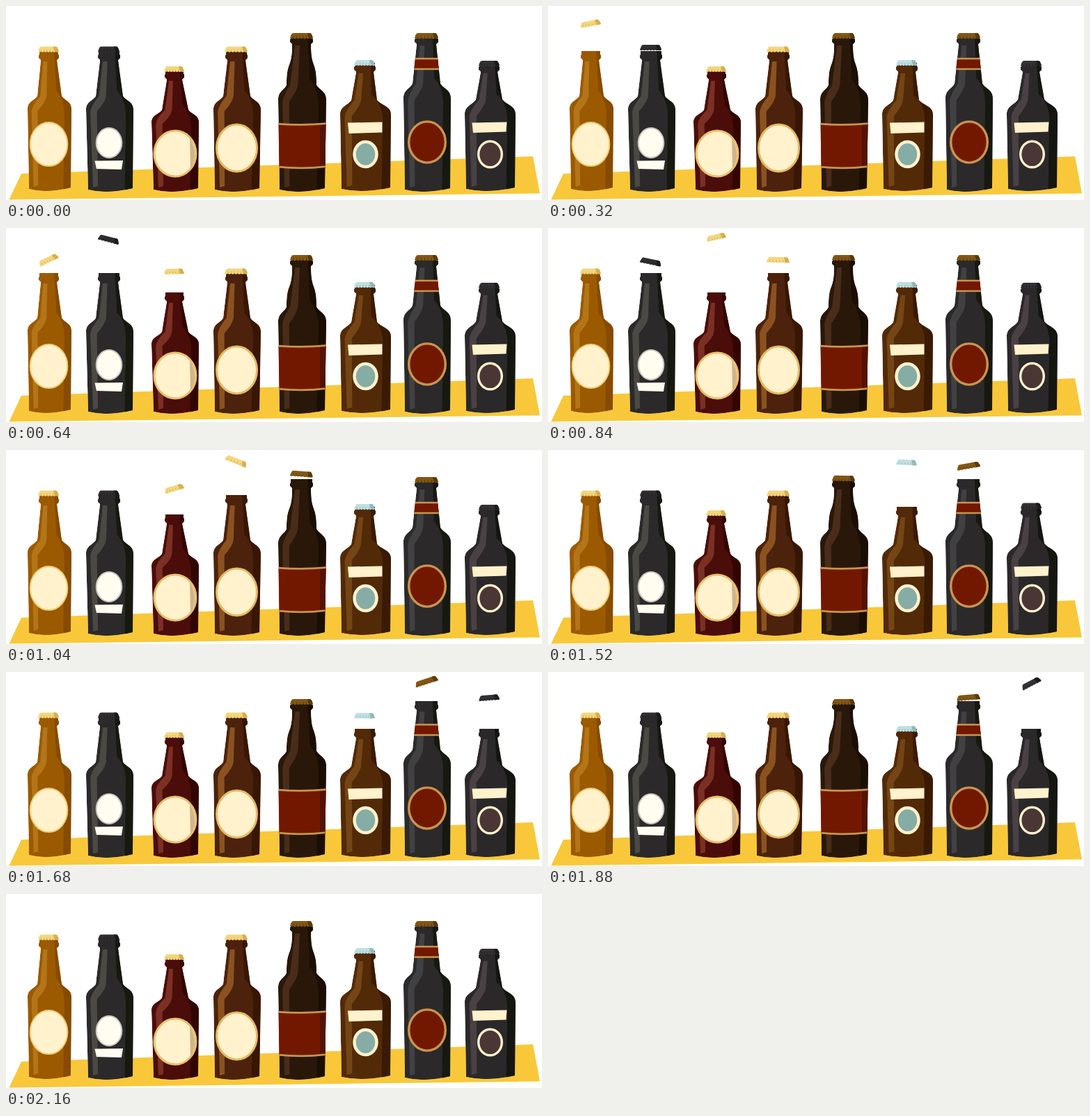
An HTML page for the animation above (3 s loop, 770 px wide and 280 px high).

```html
<!DOCTYPE html>
<html lang="en">
<head>
<meta charset="utf-8">
<title>Popping bottle caps</title>
<style>
  html, body { margin: 0; width: 100%; height: 100%; overflow: hidden; background: #fff; }
  svg { display: block; }
</style>
</head>
<body>
<svg id="stage" width="770" height="280" viewBox="0 0 770 280" xmlns="http://www.w3.org/2000/svg">
  <polygon points="22,242 757,217 767,270.5 4.5,279.5" fill="#f8c83a"/>
</svg>
<script>
const LOOP = 3000, STEP = 40;
const CREAM = '#fff2cc', RED = '#731800', TAN = '#c89550';
const stage = document.getElementById('stage');
const lerp = (a, b, k) => a + (b - a) * k;

function add(parent, tag, attrs) {
  const node = document.createElementNS('http://www.w3.org/2000/svg', tag);
  for (const key in attrs) node.setAttribute(key, attrs[key]);
  parent.appendChild(node);
  return node;
}

const oval = (cx, cy, rx, ry, fill, stroke, width) => ['ellipse',
  { cx, cy, rx, ry, fill, stroke, 'stroke-width': width }];
const poly = (points, fill) => ['polygon', { points, fill }];
const line = (d, stroke) => ['path', { d, stroke, 'stroke-width': 2.7, fill: 'none' }];

// Sections are [left, right, y]; tones are [base, light, shade]; cap is [left, right, top].
// pop is [start, duration, height, tilt, tilt skew].
const bottles = [
  { lip: [48, 75, 65], base: [45, 80, 130], body: [31, 94, 149], foot: [33, 93, 267],
    tones: ['#9b5a00', '#b37518', '#874b00'], cap: [46, 76, 58.5], capTones: ['#f3d780', '#d9ae4d'],
    pop: [36, 765, 44, -34, 1.7],
    label: [oval(61.5, 199.5, 26.8, 31.5, CREAM, '#f0cc75', 2)] },
  { lip: [133, 163, 65], base: [129, 168, 130], body: [115, 183, 150], foot: [118, 182, 268],
    tones: ['#2c292a', '#4b4943', '#171810'], cap: [132, 163, 58.5], capTones: ['#302d2f', '#1c1a1d'],
    pop: [268, 700, 46.5, 19, 1.7],
    label: [oval(148, 197.5, 18.3, 21.5, '#fffdf0', '#cbc7c2', 2),
      poly('127.5,223.5 168,223 166,236 130,235', '#fffdf0')] },
  { lip: [229, 255, 93], base: [224, 262, 150], body: [209, 277, 168], foot: [212, 276, 268],
    tones: ['#4b0d0a', '#7b3024', '#330500'], cap: [227, 256, 87], capTones: ['#f3d780', '#d9ae4d'],
    pop: [493, 715, 78, -20, 1.7],
    label: [oval(243, 213, 30, 33, CREAM, '#e9c06c', 3),
      ['path', { d: 'M264 191Q278 213 265 235Z', fill: '#cdb78d' }]] },
  { lip: [316, 346, 65], base: [312, 351, 130], body: [298, 366, 150], foot: [300, 364, 268],
    tones: ['#4c220d', '#8b5220', '#381604'], cap: [314, 347, 58.5], capTones: ['#f3d780', '#d9ae4d'],
    pop: [700, 690, 46.5, 33, 1.7],
    label: [oval(331.5, 205, 29, 34, CREAM, '#e5ba66', 3)] },
  { lip: [409, 440, 42], base: [403, 446, 114], body: [391, 460, 136], foot: [393, 458, 268], bend: 1,
    tones: ['#291809', '#4a2c1a', '#1a0e02'], cap: [408, 441, 39], capTones: ['#825717', '#5c3909'],
    pop: [925, 650, 30, 15, 1],
    label: [poly('390,170 461,170 461,233 390,233', RED), poly('451,170 461,170 461,233 451,233', '#561200'),
      line('M390 170Q425 173 461 169.5M390 232Q425 236 461 231.5', TAN)] },
  { lip: [501, 530, 82], base: [496, 533, 136], body: [480, 553, 157], foot: [482, 552, 267],
    tones: ['#532a08', '#744515', '#3a1a03'], cap: [500, 530, 78], capTones: ['#bfe0e2', '#91b8ba'],
    pop: [1110, 690, 70, 3.5, 1],
    label: [poly('491,168.5 540.5,167.5 540.5,182.5 492.5,184', CREAM),
      oval(516.5, 214, 16, 18, '#86aca6', CREAM, 4.5)] },
  { lip: [588, 620, 42], base: [584, 624, 112], body: [571, 639, 134], foot: [573, 638, 268],
    tones: ['#2b292a', '#414042', '#17180f'], cap: [587, 621, 39], capTones: ['#825717', '#5c3909'],
    pop: [1320, 660, 30, -18, 1.1],
    label: [poly('580,75 630,75 630,92 580,92', RED), line('M580 76H630M580 91H630', TAN),
      oval(605, 196.5, 26.3, 29.6, RED, TAN, 3.4)] },
  { lip: [680, 708, 82], base: [675, 713, 135], body: [659, 732, 157], foot: [661, 731, 267],
    tones: ['#2b282a', '#4a4144', '#151610'], cap: [679, 709, 79], capTones: ['#343135', '#1d1b1f'],
    pop: [1480, 680, 72, -30.5, 1.7],
    label: [poly('669.5,168.5 719.5,167.5 718.5,181.5 671,183', CREAM),
      oval(695.5, 214, 16.8, 18.8, '#4a3735', CREAM, 3.4)] }
];

// One side of the outline, listed from lip to foot.
function side(b, i) {
  const out = i ? 1 : -1, y = b.lip[2], x = b.lip[i];
  const nx = x - out * 2, ny = y + 13, [bx, by] = [b.base[i], b.base[2]];
  const [sx, sy] = [b.body[i], b.body[2]], [fx, fy] = [b.foot[i], b.foot[2]];
  const k = b.bend ? 0 : 0.33, f = b.bend ? 0.62 : 0.35;
  return [[x, y], [x, y + 5], [x + out, y + 6], [x + out, y + 10], [nx, ny],
    [lerp(nx, bx, k), lerp(ny, by, f)], [lerp(nx, bx, 1 - k), lerp(ny, by, 1 - f)], [bx, by],
    [lerp(bx, sx, 0.4), lerp(by, sy, 0.4)], [sx, lerp(by, sy, 0.4)], [sx, sy],
    [fx, fy - (i ? 5 : 3)]];
}

function outline(b) {
  const l = side(b, 0), r = side(b, 1).reverse();
  const mid = (b.foot[0] + b.foot[1]) / 2 - 4;
  return `M${l.slice(0, 5).join('L')}C${l.slice(5, 8)}C${l.slice(8, 11)}L${l[11]}` +
    `Q${mid},${b.foot[2] + 4} ${r[0]}` +
    `L${r[1]}C${r.slice(2, 5)}C${r.slice(5, 8)}L${r.slice(8).join('L')}Z`;
}

const across = (s, k) => lerp(s[0], s[1], k);

function drawBottle(b, i) {
  const d = outline(b), [tone, light, shade] = b.tones;
  add(add(stage, 'clipPath', { id: 'glass' + i }), 'path', { d });
  const g = add(stage, 'g', { 'clip-path': `url(#glass${i})` });
  add(g, 'path', { d, fill: tone });
  const [top, by, sy, fy] = [b.lip[2], b.base[2], b.body[2], b.foot[2]];
  add(g, 'path', { fill: shade, d:
    `M${across(b.lip, 0.78)},${top}L${across(b.base, 0.78)},${by - 8}` +
    `Q${across(b.body, 0.84)},${by + 6} ${across(b.body, 0.84)},${sy + 8}` +
    `L${across(b.foot, 0.82)},${fy + 4}H${b.foot[1] + 9}V${top}Z` });
  add(g, 'path', { fill: light, d:
    `M${across(b.lip, 0.2)},${top + 15}L${across(b.lip, 0.42)},${top + 15}` +
    `L${across(b.base, 0.38)},${by}Q${across(b.base, 0.34)},${by + 9} ${across(b.body, 0.23)},${sy + 2}` +
    `L${across(b.foot, 0.22)},${fy - 8}L${across(b.foot, 0.11)},${fy - 6}L${across(b.body, 0.09)},${sy + 3}` +
    `Q${across(b.body, 0.11)},${sy - 7} ${across(b.base, 0.12)},${by}Z` });
  b.label.forEach(([tag, attrs]) => add(g, tag, attrs));
}

function drawCap(b) {
  const [l, r, y] = b.cap, w = r - l, teeth = 7, bottom = y + 7;
  const [tone, shade] = b.capTones;
  const g = add(stage, 'g', {});
  let d = `M${l},${bottom}L${l + 2},${y + 2}Q${l + 2.5},${y} ${l + 5},${y}H${r - 5}Q${r - 2.5},${y} ${r - 2},${y + 2}L${r},${bottom}`;
  for (let i = 0; i < teeth; i++) d += `q${-w / teeth / 2},2.4 ${-w / teeth},0`;
  add(g, 'path', { d: d + 'Z', fill: tone });
  add(g, 'path', { d: `M${r - 8},${y}H${r - 5}Q${r - 2.5},${y} ${r - 2},${y + 2}L${r},${bottom}L${r - 6},${bottom + 1}Z`, fill: shade });
  let flutes = '';
  for (let i = 1; i < teeth; i++) flutes += `M${l + i * w / teeth},${y + 4}v3.4`;
  add(g, 'path', { d: flutes, stroke: shade, 'stroke-width': 0.8 });
  return g;
}

bottles.forEach(drawBottle);
const caps = bottles.map(drawCap);
const hump = p => Math.sin(Math.PI * p) ** 2;

function render(time) {
  const t = Math.floor(time % LOOP / STEP) * STEP;
  bottles.forEach(({ cap, pop: [start, length, height, tilt, skew] }, i) => {
    const p = Math.min(1, Math.max(0, (t - start) / length));
    const cx = (cap[0] + cap[1]) / 2, cy = cap[2] + 4.2;
    caps[i].setAttribute('transform',
      `translate(0 ${-height * hump(p)}) rotate(${tilt * hump(p ** skew)} ${cx} ${cy})`);
  });
}

const origin = performance.now();
function tick() {
  render(performance.now() - origin);
  requestAnimationFrame(tick);
}
tick();
</script>
</body>
</html>
```
